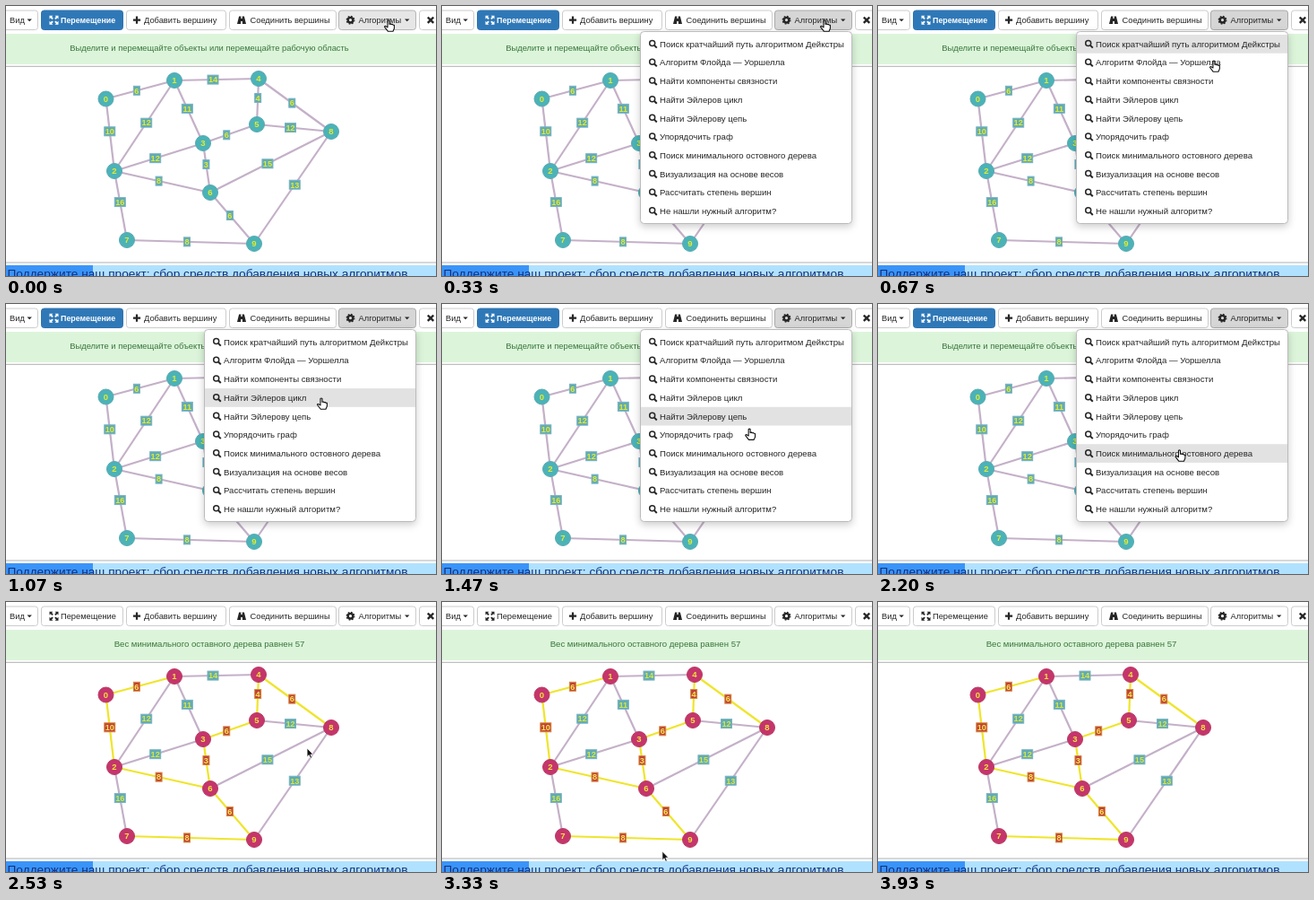
Write an HTML page that moves like this. It is 480 px wide and 301 px high and loops after 3.99 s.

```html
<!DOCTYPE html>
<html lang="ru">
<head>
<meta charset="utf-8">
<style>
html, body { margin: 0; width: 100%; height: 100%; overflow: hidden; background: #fff; }
svg { display: block; font: 9.6px "Liberation Sans", Arial, sans-serif; fill: #262626; }
.btn rect { fill: #fff; stroke: #ccc; }
.btn text { font-size: 9.3px; }
.move rect { fill: #2f78b7; stroke: #2f74b0; }
.move { fill: #fff; font-weight: bold; }
.move text { font-size: 8.9px; }
.done .move { fill: #262626; font-weight: normal; }
.done .move text { font-size: 9.3px; }
.done .move rect { fill: #fff; stroke: #ccc; }
.algo rect { fill: #e6e6e6; stroke: #b5b5b5; }
.open .algo rect { fill: #d6d6d6; stroke: #aaa; }
.done .algo rect { fill: #fff; stroke: #ccc; }
.msg { fill: #38753a; text-anchor: middle; }
.hint { font-size: 9.4px; }
.result, .menu, .arrow, .open .arrow { display: none; }
.done .result, .open .menu, .done .arrow { display: inline; }
.done .hint, .done .hand { display: none; }
.menu .panel { fill: #fff; stroke: #bbb; filter: drop-shadow(0 3px 4px #0003); }
.graph { font-size: 9.5px; font-weight: bold; text-anchor: middle; }
.graph line { stroke: #c4b0c8; stroke-width: 2.2; }
.graph circle { fill: #4bb3b7; stroke: #58a9b3; }
.graph rect { fill: #5fabb2; stroke: #79b2c4; }
.graph text { fill: #e2ea30; }
.graph .tag { font-size: 9.2px; }
.done .graph circle { fill: #c5356c; stroke: #b83a60; }
.done .graph .tree line { stroke: #efe52c; }
.done .graph .tree rect { fill: #c23f3c; stroke: #d48a3c; }
.done .graph text { fill: #efe43c; }
.done .graph .tag { fill: #d9e640; }
.done .graph .tree .tag { fill: #f6e94a; }
</style>
</head>
<body>
<svg id="stage" width="480" height="301" viewBox="0 0 480 301"></svg>
<script>
const LOOP = 3990, OPEN = 330, DONE = 2270, ROW_TOP = 32, ROW = 20.7;

const nodes = [[111.5, 103.5], [188, 83], [121, 184], [220, 153], [282, 81],
  [280, 132], [228, 208], [135, 261], [363, 140], [277, 265]];

// from, to, weight, belongs to the spanning tree
const edges = [[0, 1, 6, 1], [1, 4, 14], [0, 2, 10, 1], [1, 2, 12], [1, 3, 11],
  [4, 5, 4, 1], [4, 8, 6, 1], [5, 8, 12], [3, 5, 6, 1], [2, 3, 12], [3, 6, 3, 1],
  [2, 6, 8, 1], [6, 8, 15], [2, 7, 16], [7, 9, 8, 1], [6, 9, 6, 1], [8, 9, 13]];

const items = ['Поиск кратчайший путь алгоритмом Дейкстры', 'Алгоритм Флойда — Уоршелла',
  'Найти компоненты связности', 'Найти Эйлеров цикл', 'Найти Эйлерову цепь',
  'Упорядочить граф', 'Поиск минимального остовного дерева',
  'Визуализация на основе весов', 'Рассчитать степень вершин', 'Не нашли нужный алгоритм?'];

// time, x, y of the pointer tip
const path = [[0, 427, 16], [500, 427, 16], [670, 375, 61], [1070, 352, 105],
  [1750, 337, 163], [2600, 336, 163], [3330, 246, 278], [3560, 224, 306], [LOOP, 224, 306]];

const text = (x, y, s, cls = '') => `<text x="${x}" y="${y}" class="${cls}">${s}</text>`;
const at = (x, y, s) => `<g transform="translate(${x} ${y})">${s}</g>`;
const caret = x => `<path d="M${x} 14.5h5.4l-2.7 2.8z"/>`;
const button = (x, w, s, cls = '') =>
  `<g class="btn ${cls}"><rect x="${x + .5}" y="5" width="${w - 1}" height="21.5" rx="3"/>${s}</g>`;

const icons = {
  expand: [0, 90, 180, 270].map(a => `<path transform="rotate(${a})"
    d="M-5-5h3.9l-1.3 1.3 1.7 1.7-1.3 1.3-1.7-1.7L-5-1.1z"/>`).join(''),
  plus: '<path d="M-1.1-4.1h2.2v3h3v2.2h-3v3h-2.2v-3h-3v-2.2h3z"/>',
  road: '<path d="M-2.9-4.2h2.2v2.4h1.4v-2.4h2.2L5 4.2H.9V1.2H-.9v3H-5z"/>',
  cog: `<circle r="2.8" fill="none" stroke="#262626" stroke-width="2.4"/>
    <circle r="4.3" fill="none" stroke="#262626" stroke-width="1.3" stroke-dasharray="1.69"/>`,
  cross: '<path d="M-3.2-3.2 3.2 3.2M3.2-3.2-3.2 3.2" stroke="#262626" stroke-width="2.4"/>',
  search: `<circle cx="-.8" cy="-.8" r="3" fill="none" stroke="#262626" stroke-width="1.5"/>
    <path d="M1.5 1.5 4.3 4.3" stroke="#262626" stroke-width="2"/>`
};

const toolbar = button(-6, 42, text(4, 19, 'Вид') + caret(23.5)) +
  button(39, 92, at(53.5, 15.7, icons.expand) + text(61, 19, 'Перемещение'), 'move') +
  button(134, 112, at(146, 15.7, icons.plus) + text(154, 19, 'Добавить вершину')) +
  button(249, 120, at(263, 15.7, icons.road) + text(272.5, 19, 'Соединить вершины')) +
  button(371, 87, at(384.5, 15.7, icons.cog) + text(393.5, 19, 'Алгоритмы') + caret(445), 'algo') +
  button(461, 40, at(474, 15.7, icons.cross));

function drawEdge([a, b, weight, tree]) {
  const [x1, y1] = nodes[a], [x2, y2] = nodes[b];
  const k = .5 - 4 / Math.hypot(x2 - x1, y2 - y1);
  const w = weight > 9 ? 12 : 7;
  return `<g class="${tree ? 'tree' : ''}"><line x1="${x1}" y1="${y1}" x2="${x2}" y2="${y2}"/>` +
    at(x1 + (x2 - x1) * k, y1 + (y2 - y1) * k,
      `<rect x="${-w / 2}" y="-5" width="${w}" height="10"/>` + text(0, 3.3, weight, 'tag')) + '</g>';
}

const drawNode = ([x, y], i) => at(x, y, '<circle r="8.5"/>' + text(0, 3.4, i));

const menu = `<g class="menu"><rect class="panel" x="221.5" y="28.5" width="236" height="214" rx="4"/>
  <rect id="hover" x="222" width="235" height="${ROW}" fill="#e2e2e2"/>` +
  items.map((s, i) => {
    const y = ROW_TOP + ROW * (i + .5);
    return at(235.5, y, icons.search) + text(243, y + 3.4, s);
  }).join('') + '</g>';

const pointer = `<g id="pointer">
  <path class="hand" fill="#fff" stroke="#111" stroke-width="1.1" stroke-linejoin="round"
    d="M-1 .4q1-1 2 0v3.8l1.6-.3.4.6 1.6-.1.4.7 1.4.2V9L5 12.2H-.7L-4.4 7.4q0-1.4 1.4-.8L-1 7.8z"/>
  <path class="arrow" fill="#111" stroke="#fff" stroke-width=".7"
    d="M0 0v9.6l2.2-2 1.5 3.6 1.7-.7-1.5-3.5h3z"/></g>`;

const stage = document.getElementById('stage');
stage.innerHTML = toolbar +
  `<rect y="31" width="480" height="34" fill="#dcf5da"/>` +
  text(227, 50.2, 'Выделите и перемещайте объекты или перемещайте рабочую область', 'msg hint') +
  text(227, 50.2, 'Вес минимального оставного дерева равнен 57', 'msg result') +
  `<path d="M0 67.3h480M0 286h480" stroke="#b0b0b0"/>
  <g class="graph">${edges.map(drawEdge).join('')}${nodes.map(drawNode).join('')}</g>
  <rect y="289" width="480" height="12" fill="#b0e2ff"/>
  <rect y="289" width="97" height="12" fill="#3a94f8"/>
  <text x="1.5" y="302.7" font-size="13.7" fill="#16307c">Поддержите наш проект: сбор средств добавления новых алгоритмов</text>` +
  menu + pointer;

const hover = document.getElementById('hover');
const cursor = document.getElementById('pointer');

function tip(t) {
  const i = path.findIndex(p => p[0] > t);
  const [t0, x0, y0] = path[i - 1], [t1, x1, y1] = path[i];
  const k = (t - t0) / (t1 - t0);
  return [x0 + (x1 - x0) * k, y0 + (y1 - y0) * k];
}

function render(now) {
  const t = now % LOOP;
  stage.setAttribute('class', t < OPEN ? '' : t < DONE ? 'open' : 'done');
  cursor.setAttribute('transform', `translate(${tip(t)})`);
  // the highlight trails the pointer slightly
  const row = Math.floor((tip(Math.max(0, t - 50))[1] - ROW_TOP) / ROW);
  hover.setAttribute('y', ROW_TOP + ROW * row);
  hover.style.display = row < 0 ? 'none' : '';
}

const start = performance.now();
function tick() {
  render(performance.now() - start);
  requestAnimationFrame(tick);
}
tick();
</script>
</body>
</html>
```
